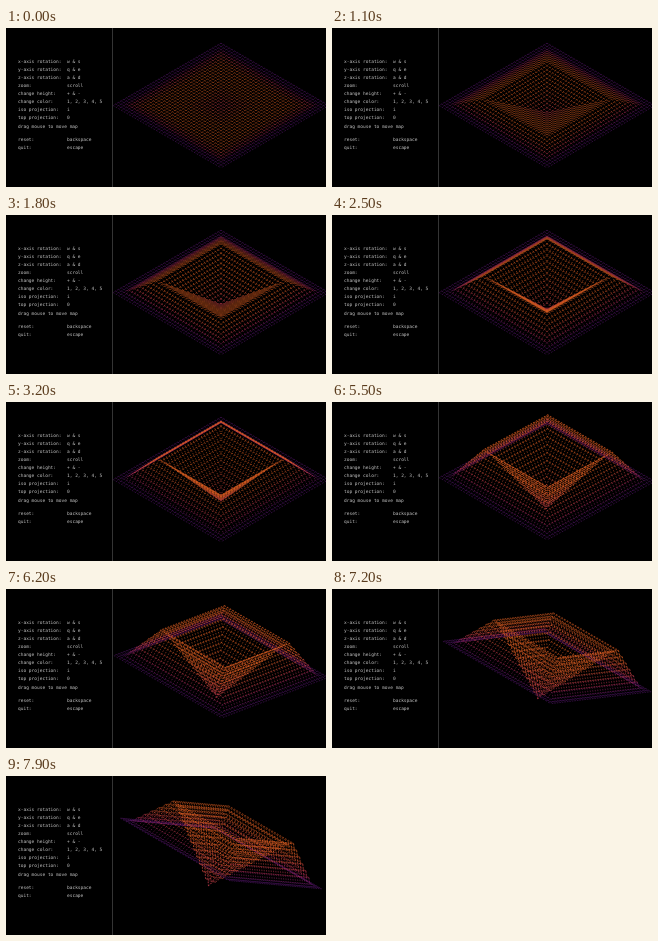
An HTML page with a canvas that plays this animation: 320x159 px, repeating every 8 s.

```html
<!DOCTYPE html>
<html lang="en">
<head>
<meta charset="utf-8">
<title>Wireframe map viewer</title>
<style>
  html, body { margin: 0; width: 100%; height: 100%; overflow: hidden; background: #000; }
  canvas, svg { position: absolute; left: 0; top: 0; width: 320px; height: 159px; }
  text {
    font: 4.53px "DejaVu Sans Mono", "Liberation Mono", monospace;
    fill: #c4c4c4;
    white-space: pre;
    text-rendering: geometricPrecision;
  }
</style>
</head>
<body>
<canvas id="map" width="320" height="159"></canvas>
<svg id="menu" viewBox="0 0 320 159"><path d="M106.5 0V159" stroke="#343434"/></svg>
<script>
const LOOP = 8000, STEP = 100;
const CELLS = 40, RIM = 0.59, FOOT = 0.91, PIT = 1;
const CENTER = [215, 77.5], HALF = 62.3;
const COS30 = Math.cos(Math.PI / 6), SIN30 = 0.5;
const SHADES = 20;

// [time in ms, value]
const HEIGHT = [[0, 0], [250, 0.2], [4200, 29], [8000, 29]];
const TILT = [[0, 0], [4600, 0], [5400, 0.6], [6200, 9.7], [8000, 31.2]];

const MENU = [
  ["x-axis rotation:", "w & s"],
  ["y-axis rotation:", "q & e"],
  ["z-axis rotation:", "a & d"],
  ["zoom:", "scroll"],
  ["change height:", "+ & -"],
  ["change color:", "1, 2, 3, 4, 5"],
  ["iso projection:", "i"],
  ["top projection:", "0"],
  ["drag mouse to move map", ""],
  ["reset:", "backspace"],
  ["quit:", "escape"]
];

const ctx = document.getElementById("map").getContext("2d");
const menu = document.getElementById("menu");

function addText(x, y, label) {
  const node = document.createElementNS("http://www.w3.org/2000/svg", "text");
  node.setAttribute("x", x);
  node.setAttribute("y", y);
  node.textContent = label;
  menu.append(node);
}

MENU.forEach(([label, keys], i) => {
  const y = 35 + i * 8.07 + (i > 8 ? 5 : 0);
  addText(12, y, label);
  if (keys) addText(61, y, keys);
});

const mix = (a, b, t) => a + (b - a) * t;

function track(keys, time) {
  const i = Math.max(1, keys.findIndex(k => k[0] >= time));
  const [t0, a] = keys[i - 1], [t1, b] = keys[i];
  return mix(a, b, (time - t0) / (t1 - t0));
}

// Square ring with a sunken, inverted pyramid inside.
function relief(r) {
  if (r >= FOOT) return 0;
  if (r > RIM) return (FOOT - r) / (FOOT - RIM);
  return 1 - (1 + PIT) * (1 - r / RIM);
}

function heat(r) {
  return r > RIM ? relief(r) : mix(0.3, 1, r / RIM);
}

function shade(t) {
  const purple = [96, 26, 122], magenta = [190, 50, 92], orange = [232, 100, 36];
  const [a, b, k] = t < 0.2 ? [purple, magenta, t / 0.2] : [magenta, orange, Math.min(1, (t - 0.2) / 0.5)];
  return `rgb(${a.map((c, i) => Math.round(mix(c, b[i], k)))})`;
}

const colors = Array.from({ length: SHADES }, (_, i) => shade(i / (SHADES - 1)));
const radius = (x, y) => Math.max(Math.abs(x), Math.abs(y));

function projector(time) {
  const height = track(HEIGHT, time);
  const angle = track(TILT, time) * Math.PI / 180;
  const c = Math.cos(angle), s = Math.sin(angle);
  return (u, v) => {
    const x = u * HALF, y0 = v * HALF, z0 = relief(radius(u, v)) * height;
    const y = y0 * c - z0 * s, z = y0 * s + z0 * c;
    return [CENTER[0] + (x - y) * COS30, CENTER[1] + (x + y) * SIN30 - z];
  };
}

function draw(time) {
  const project = projector(time);
  const paths = colors.map(() => new Path2D());
  const at = i => i * 2 / CELLS - 1;

  const edge = (u0, v0, u1, v1) => {
    const t = heat(radius((u0 + u1) / 2, (v0 + v1) / 2));
    const path = paths[Math.round(t * (SHADES - 1))];
    path.moveTo(...project(u0, v0));
    path.lineTo(...project(u1, v1));
  };

  for (let i = 0; i <= CELLS; i++) {
    for (let j = 0; j < CELLS; j++) {
      edge(at(i), at(j), at(i), at(j + 1));
      edge(at(j), at(i), at(j + 1), at(i));
    }
  }

  ctx.clearRect(0, 0, 320, 159);
  ctx.lineWidth = 0.6;
  ctx.globalAlpha = 0.85;
  ctx.setLineDash([1.5, 1.5]);
  paths.forEach((path, i) => {
    ctx.strokeStyle = colors[i];
    ctx.stroke(path);
  });
}

const start = performance.now();
let shown = -1;

function tick() {
  const elapsed = (performance.now() - start) % LOOP;
  const time = Math.floor(elapsed / STEP) * STEP;
  if (time !== shown) draw(shown = time);
  requestAnimationFrame(tick);
}
tick();
</script>
</body>
</html>
```
